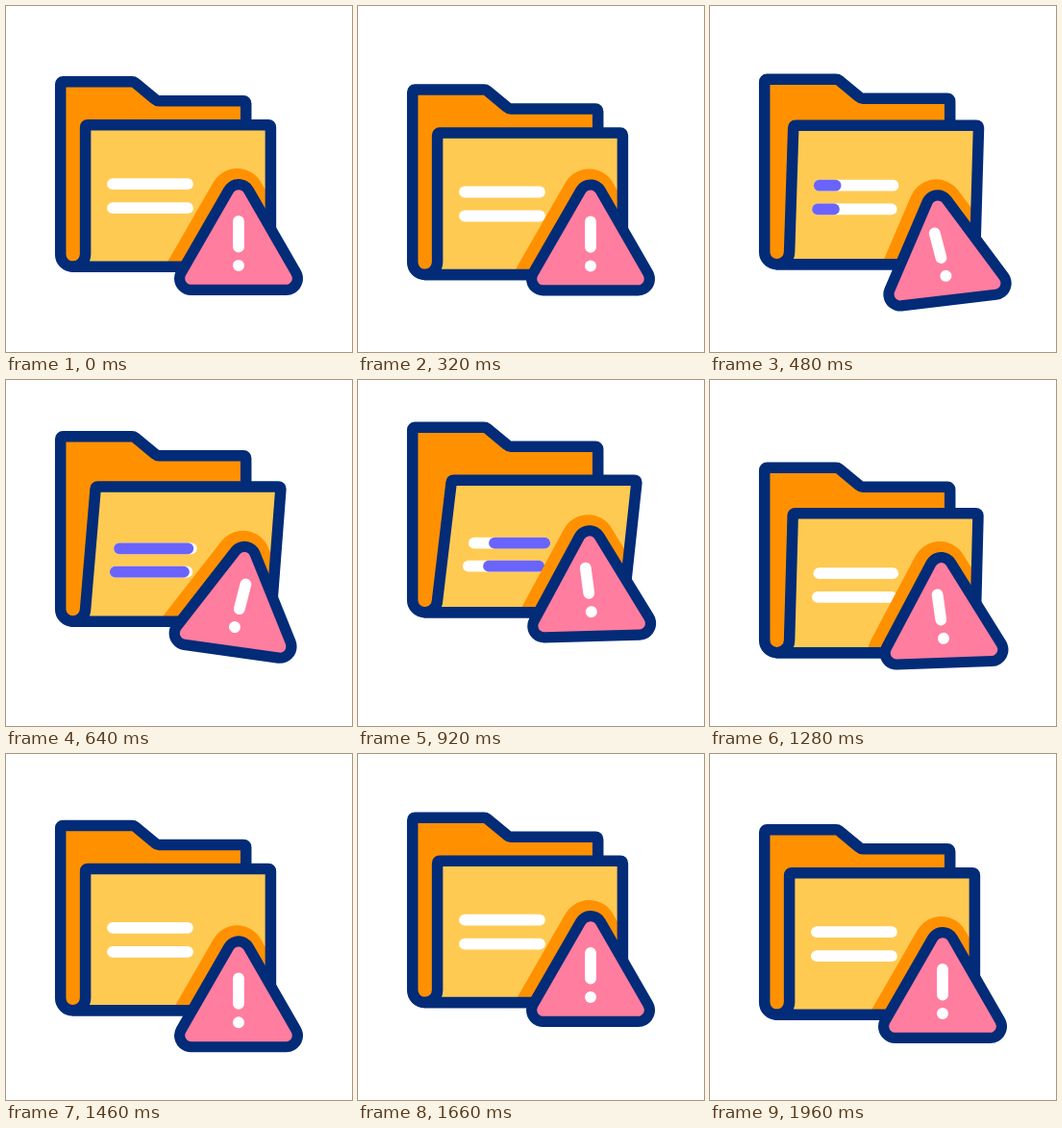
Animation of 360 by 360 pixels, one loop 2320 ms. Source, as an HTML page:

```html
<!DOCTYPE html>
<html lang="en">
<head>
<meta charset="utf-8">
<title>Folder warning</title>
<style>
  html, body { margin: 0; height: 100%; overflow: hidden; background: #fff; }
  svg { display: block; width: 100%; height: 100%; }
  path { stroke-linecap: round; stroke-linejoin: round; }
  .navy { stroke: #022b78; stroke-width: 11.5; }
  .bar { stroke: #fff; stroke-width: 11.8; fill: none; }
  .sweep { stroke: #6a64fc; }
</style>
</head>
<body>
<svg viewBox="0 0 360 360">
  <defs>
    <path id="tri" d="M242 197.5 L291.5 283.5 H192.5 Z"/>
    <clipPath id="clip"><path id="clipShape"/></clipPath>
  </defs>
  <g id="folder">
    <path class="navy" fill="#ff9100" d="M69.5 271.2 A12.8 12.8 0 0 1 56.7 258.4 V81.5 Q56.7 78.8 59.4 78.8 H131 Q133 78.8 134.5 80 L155 97 Q157 98.8 159 98.8 H247 Q249.7 98.8 249.7 101.5 V271.2 Z"/>
    <path id="panelFill" fill="#ffca52"/>
    <path class="bar"/>
    <path class="bar"/>
    <path class="bar sweep"/>
    <path class="bar sweep"/>
    <g clip-path="url(#clip)">
      <use id="shade" href="#tri" fill="#ff9100" stroke="#ff9100" stroke-width="57"/>
    </g>
    <path id="panelEdge" class="navy" fill="none"/>
  </g>
  <g id="sign">
    <use href="#tri" fill="#022b78" stroke="#022b78" stroke-width="35"/>
    <use href="#tri" fill="#ff7d9f" stroke="#ff7d9f" stroke-width="12.6"/>
    <g id="mark">
      <path class="bar" d="M242 224 V250.5"/>
      <circle cx="242" cy="270" r="6" fill="#fff"/>
    </g>
  </g>
</svg>
<script>
const LOOP = 2320, STEP = 20;
const SIGN_LAG = 80, MARK_LAG = 40;
const $ = id => document.getElementById(id);
const bars = document.querySelectorAll('#folder .bar');

// Keys are [time, value, bias]; a bias below 1 makes the move towards that key start faster.
const lift = [[220, 0], [390, 13], [920, -29.5, .5], [1030, -29.5], [1314, 14], [1575, -17], [1825, 0]];
const open = [[390, 0], [920, 1, .58], [1050, 1], [1394, 0]];
const rock = [[320, 0], [445, -8], [640, 8], [835, -8], [1030, 8], [1200, -8], [1320, 0]];
const sweepEnd = [[390, 0], [680, 1]];
const sweepStart = [[790, 0], [1150, 1]];

function at(keys, t) {
  if (t <= keys[0][0]) return keys[0][1];
  for (let i = 1; i < keys.length; i++) {
    const [t0, v0] = keys[i - 1], [t1, v1, bias = 1] = keys[i];
    if (t < t1) {
      const u = ((t - t0) / (t1 - t0)) ** bias;
      return v0 + (v1 - v0) * (1 - Math.cos(Math.PI * u)) / 2;
    }
  }
  return keys[keys.length - 1][1];
}

function panelPath(k) {
  const dx = 14.5 * k, top = 123.8 + 10 * k, left = 82.6 + dx, right = 275.4 + dx;
  return `M69.5 271.2 A13 13 0 0 0 82.6 258.4 L${left} ${top + 2.5} Q${left} ${top} ${left + 2.5} ${top}` +
    ` H${right - 2.5} Q${right} ${top} ${right} ${top + 2.5} L275.4 271.2 Z`;
}

function drawBars(k, from, to) {
  const half = 39 * (1 - .06 * k);
  for (let i = 0; i < 2; i++) {
    const mid = 150 + (i ? 1.5 : 7.5) * k;
    const y = 185.2 + 25 * i + (14 - i) * k;
    const span = (a, b) => `M${mid - half + 2 * half * a} ${y} H${mid - half + 2 * half * b}`;
    bars[i].setAttribute('d', span(0, 1));
    bars[i + 2].setAttribute('d', to > from && to > 0 ? span(from, to) : '');
  }
}

function draw(t) {
  const y = at(lift, t), signY = at(lift, t - SIGN_LAG);
  const k = at(open, t), turn = at(rock, t);
  const panel = panelPath(k);
  for (const id of ['clipShape', 'panelFill', 'panelEdge']) $(id).setAttribute('d', panel);
  drawBars(k, at(sweepStart, t), at(sweepEnd, t));
  $('folder').setAttribute('transform', `translate(0 ${y})`);
  $('shade').setAttribute('transform', `translate(-1.5 ${signY - y}) rotate(${turn} 242 241)`);
  $('sign').setAttribute('transform', `translate(0 ${signY}) rotate(${turn} 242 241)`);
  $('mark').setAttribute('transform', `rotate(${at(rock, t - MARK_LAG)} 242 270)`);
}

const start = performance.now();
function tick() {
  const t = (performance.now() - start) % LOOP;
  draw(Math.floor(t / STEP) * STEP);
  requestAnimationFrame(tick);
}
tick();
</script>
</body>
</html>
```
